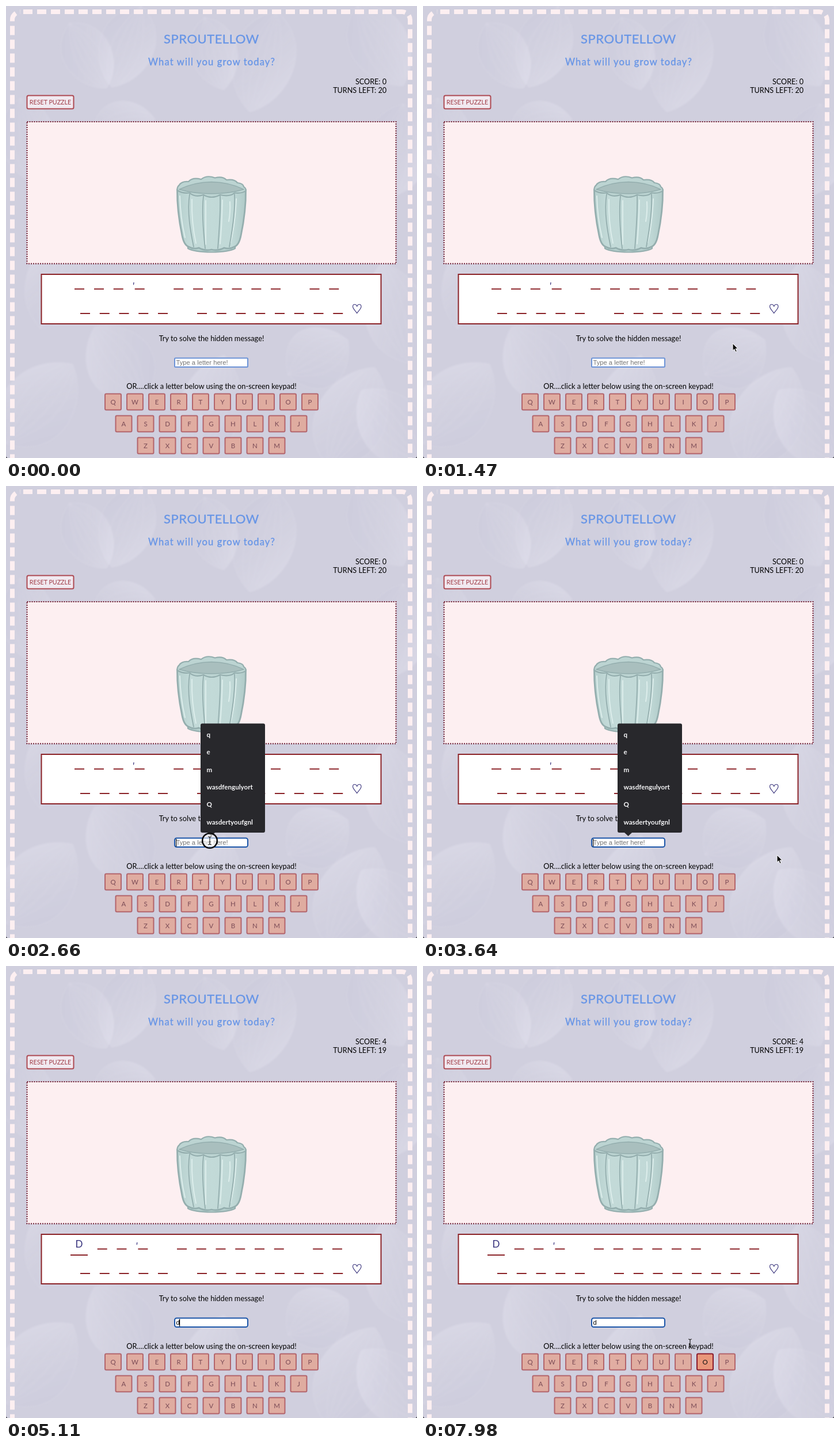
Animation, 714 px wide and 785 px high, one loop 8 s. Source, as an HTML page:

```html
<!DOCTYPE html>
<html lang="en">
<head>
<meta charset="utf-8">
<title>Sproutellow</title>
<style>
  html, body { margin: 0; width: 100%; height: 100%; overflow: hidden; background: #2a2a30; }
  svg { display: block; width: 714px; height: 785px; border-radius: 0 0 4px 4px; }
  text { font-family: Lato, "Open Sans", sans-serif; font-size: 12.8px; white-space: pre; }
  .mid { text-anchor: middle; }
  .end { text-anchor: end; font-size: 12.6px; }
  .head { fill: #6795e6; stroke: #6795e6; stroke-width: .35; }
  .field { font: 11.2px "Liberation Sans", Arial, sans-serif; }
  .list text { font-size: 11.6px; font-weight: 700; fill: #f4f4f6; }
  .key rect { fill: #e9967a; fill-opacity: .62; stroke: #a3424c; stroke-opacity: .72; stroke-width: 2; }
  .key text { font-size: 11.5px; fill: #7b4c56; text-anchor: middle; }
  .key.on rect { fill-opacity: 1; stroke: #8b1a2b; stroke-opacity: 1; }
  .key.on text { fill: #111; }
</style>
</head>
<body>
<svg viewBox="0 0 714 785">
  <defs>
    <linearGradient id="sheen" x1="0" y1="0" x2="1" y2="1">
      <stop offset="0" stop-color="#f1f0fa" stop-opacity=".75"/>
      <stop offset=".55" stop-color="#dfdeea" stop-opacity=".25"/>
      <stop offset="1" stop-color="#b9b7cc" stop-opacity=".3"/>
    </linearGradient>
    <linearGradient id="glaze">
      <stop offset="0" stop-color="#b5cfcd"/>
      <stop offset=".2" stop-color="#c3dad8"/>
      <stop offset=".8" stop-color="#c1d9d7"/>
      <stop offset="1" stop-color="#b0cac8"/>
    </linearGradient>
    <filter id="soft"><feGaussianBlur stdDeviation="1.6"/></filter>
  </defs>

  <rect width="714" height="785" fill="#d0cfde"/>
  <g id="petals" filter="url(#soft)"></g>
  <rect x="11" y="10" width="691" height="860" rx="14" fill="none" stroke="#fdeff1"
    stroke-width="8" stroke-dasharray="16 8" stroke-dashoffset="-5"/>

  <text class="mid head" x="357" y="65" style="font-size:22px;letter-spacing:.5px">SPROUTELLOW</text>
  <text class="mid head" x="357.5" y="103" style="font-size:16.5px;letter-spacing:1.15px">What will you grow today?</text>
  <text class="end" id="score" x="661" y="136"></text>
  <text class="end" id="turns" x="661" y="151"></text>

  <rect x="36.5" y="155.5" width="81" height="23" rx="2.5" fill="#f1e9f0" stroke="#ad4a53" stroke-width="2"/>
  <text class="mid" x="77" y="171" style="font-size:10.7px" fill="#a03c47">RESET PUZZLE</text>

  <rect x="36.5" y="201" width="641" height="246.5" fill="#fdeff1" stroke="#6f1c31" stroke-width="2" stroke-dasharray="2 2"/>

  <g stroke="#94aeae" stroke-width="2.2" stroke-linejoin="round" stroke-linecap="round" fill="none">
    <path fill="#b5cfcd" d="M316 414V421Q326 427 357 427.500Q388 427 398 421V414Z"/>
    <path fill="url(#glaze)" stroke-width="2.8" d="M297.500 319C297 348 302 380 306 399C308 409 312 416 317 418
      Q326 423 335 420Q346 426 357 423Q368 426 379 420Q388 423 397 418C402 416 406 409 408 399C412 380 417 348 416.500 319Z"/>
    <path stroke="#dcedeb" stroke-width="2" d="M302 330Q303 368 311 402M323 336Q322 376 330 412M347 338V414
      M376 337Q375 380 372 413M400 335Q398 380 390 411M389 340Q390 358 387 374"/>
    <path stroke-width="1.8" d="M319 327C314 358 321 394 326 418M343 330C340 358 343 394 346 421
      M372 330C373 358 370 394 368 421M397 327C399 358 392 396 388 418"/>
    <path fill="#bcd4d2" d="M297.500 320Q297 314 301 311Q305 304 317 305Q324 297 339 301Q349 293 363 298.500
      Q376 295 383 302Q397 300 402 307Q412 308 413 314Q417 316 416.500 321Q410 326 397 324.500
      Q389 332 372 328Q357 336 343 328Q328 333 319 324.500Q306 326 297.500 320Z"/>
    <path fill="#a9bfbe" stroke-width="1.6" d="M301 318.500Q326 306 357 305.500Q388 306 413 318.500Q388 326 357 326Q326 326 301 318.500Z"/>
  </g>

  <rect x="61.500" y="466" width="590" height="86" fill="#fff" stroke="#8b2328" stroke-width="2"/>
  <path id="blanks" stroke="#8b2328" stroke-width="2"/>
  <g fill="#35307c">
    <text id="quote" y="493" style="font-size:17px;font-style:italic">'</text>
    <text id="found" class="mid" x="127" y="489" style="font-size:17px">D</text>
  </g>
  <path fill="none" stroke="#443f83" stroke-width="1.2"
    d="M609.700 533.500C607 529 602.500 526 602.500 522C602.500 517 608.500 517 609.700 522C611 517 617 517 617 522C617 526 612.500 529 609.700 533.500Z"/>

  <text class="mid" x="357" y="581.500">Try to solve the hidden message!</text>
  <rect id="box" x="293" y="611.500" width="127" height="15.500" fill="#fff" stroke-width="2"/>
  <text class="field" id="typed" x="295.500" y="623"></text>
  <rect id="caret" y="613" width="1.200" height="13"/>

  <text class="mid" x="357" y="665">OR....click a letter below using the on-screen keypad!</text>
  <g id="keys"></g>

  <g id="list" class="list">
    <path fill="#28282c" d="M341 412.500H447Q450 412.500 450 415.500V599Q450 602 447 602H363L356.500 608L350 602H341Q338 602 338 599V415.500Q338 412.500 341 412.500Z"/>
  </g>
  <circle id="ring" cx="354" cy="616" r="12.800" fill="#fff" fill-opacity=".55" stroke="#0c0c0e" stroke-width="2.600"/>
  <path id="arrow" fill="#0a0a0a" stroke="#fff" stroke-width="1" d="M0 0V12.500L2.900 9.900L5 14.800L7.200 13.800L5.100 9.100H9Z"/>
  <path id="beam" fill="none" stroke="#222" stroke-width="1.200" d="M-3 -7Q0 -7 0 -5Q0 -7 3 -7M0 -5V5M-3 7Q0 7 0 5Q0 7 3 7M-1.500 2H1.500"/>
</svg>
<script>
const LOOP = 8000, STEP = 70;
const TYPED = 5110, OPENED = 2590, BACK = 7070;
const $ = id => document.getElementById(id);

function add(parent, tag, attrs, text = '') {
  const el = document.createElementNS('http://www.w3.org/2000/svg', tag);
  for (const name in attrs) el.setAttribute(name, attrs[name]);
  el.textContent = text;
  return parent.appendChild(el);
}
const show = (el, on) => { el.style.display = on ? '' : 'none'; };

// Petals: base x, base y, length, half width, angle
[
  [110, 30, 130, 62, 150], [235, 0, 150, 70, 200], [345, 20, 130, 60, 165],
  [470, 10, 180, 80, 195], [610, 0, 160, 75, 150], [25, 160, 150, 70, 170],
  [150, 215, 110, 60, 80], [690, 170, 160, 85, 185], [60, 560, 190, 80, 20],
  [0, 760, 180, 90, 40], [240, 680, 150, 85, -35], [330, 790, 190, 80, 15],
  [490, 640, 120, 80, 60], [560, 800, 190, 90, 25], [700, 620, 180, 80, -15],
  [720, 790, 160, 80, -40]
].forEach(([x, y, len, w, angle]) => {
  const petal = add($('petals'), 'g', { transform: `translate(${x} ${y}) rotate(${angle})`, opacity: .55 });
  add(petal, 'path', {
    fill: 'url(#sheen)', stroke: '#e9e8f3', 'stroke-opacity': .5,
    d: `M0 0C${w} ${-len * .2} ${w * .8} ${-len * .8} 0 ${-len}C${-w * .8} ${-len * .8} ${-w} ${-len * .2} 0 0Z`
  });
  for (let k = -2; k <= 2; k++) add(petal, 'path', {
    fill: 'none', stroke: '#e8e7f2', 'stroke-opacity': .4,
    d: `M0 0Q${k * w * .32} ${-len * .5} ${k * w * .08} ${-len * .92}`
  });
});

const keys = [];
[['QWERTYUIOP', 186, 687.5], ['ASDFGHLKJ', 204.5, 725.5], ['ZXCVBNM', 242.5, 763.5]].forEach(([row, x0, y]) =>
  [...row].forEach((letter, i) => {
    const x = x0 + i * 38;
    const el = add($('keys'), 'g', { class: 'key' });
    add(el, 'rect', { x: x - 14, y: y - 14, width: 28, height: 28, rx: 2 });
    add(el, 'text', { x, y: y + 4.5 }, letter);
    keys.push({ el, x, y });
  }));

['q', 'e', 'm', 'wasdfengulyort', 'Q', 'wasdertyoufgnl'].forEach((word, i) =>
  add($('list'), 'text', { x: 348.5, y: 436 + i * 30.3 }, word));

const PITCH = 33.75;
const run = (x, n, y) => Array.from({ length: n }, (_, i) => `M${x + i * PITCH} ${y}h17`).join('');
function blanks(solved) {
  const dx = solved ? 5.7 : 0;
  const first = solved ? 'M112 502h30' : run(119, 1, 491.5);
  return first + run(153 + dx, 2, 491.5) + run(223.7 + dx, 1, 491.5) + run(291.3 + dx, 6, 491.5)
    + run(527.5 + dx, 2, 491.5) + run(129, 5, 534) + run(332, 8, 534);
}

// Pointer stops: time, x, y
const PATH = [
  [630, 8, 772], [910, 687, 571], [980, 687, 571], [1050, 703, 591], [1260, 703, 591],
  [1470, 538, 586], [1750, 462, 645], [1890, 462, 645], [2380, 354, 616], [2800, 354, 616],
  [3080, 615, 641], [7000, 615, 641], [BACK, 612, 639], [7350, 540, 686],
  [7840, 232, 655], [7910, 486, 688], [7980, 464, 655]
];
function pointer(t) {
  const i = PATH.findIndex(p => p[0] > t);
  if (i === 0) return PATH[0].slice(1);
  if (i < 0) return PATH[PATH.length - 1].slice(1);
  const [t0, x0, y0] = PATH[i - 1], [t1, x1, y1] = PATH[i];
  const k = (t - t0) / (t1 - t0);
  return [x0 + (x1 - x0) * k, y0 + (y1 - y0) * k];
}
const within = (x, y, l, t, r, b) => x >= l && x <= r && y >= t && y <= b;

const CARET = [OPENED, 3080, 3640, 4130, 4690, 5670, 6160, 6720, 7280, 7770];

function draw(time) {
  const t = Math.floor(time / STEP) * STEP;
  const solved = t >= TYPED, focus = t >= OPENED;

  $('score').textContent = `SCORE: ${solved ? 4 : 0}`;
  $('turns').textContent = `TURNS LEFT: ${solved ? 19 : 20}`;
  $('blanks').setAttribute('d', blanks(solved));
  $('quote').setAttribute('x', solved ? 225.2 : 219.5);
  show($('found'), solved);

  $('box').setAttribute('stroke', focus ? '#1b55a8' : '#6c93d6');
  $('box').setAttribute('rx', focus ? 3.5 : 1.5);
  $('typed').textContent = solved ? 'd' : 'Type a letter here!';
  $('typed').setAttribute('fill', solved ? '#000' : '#757575');
  $('caret').setAttribute('x', solved ? 301 : 295);
  show($('caret'), CARET.filter(c => c <= t).length % 2);
  show($('list'), focus && !solved);
  show($('ring'), t >= OPENED && t < 2730);

  const [x, y] = pointer(t);
  const seen = t >= PATH[0][0] && !(solved && t < BACK);
  const overText = within(x, y, 292, 610, 421, 628) || within(x, y, 212, 652, 502, 668);
  for (const [id, on] of [['arrow', seen && !overText], ['beam', seen && overText]]) {
    show($(id), on);
    $(id).setAttribute('transform', `translate(${x} ${y})`);
  }

  // Key highlights trail the pointer by one step.
  const [hx, hy] = pointer(t - STEP);
  for (const key of keys)
    key.el.classList.toggle('on', t > BACK && Math.abs(hx - key.x) < 15 && Math.abs(hy - key.y) < 15);
}

const start = performance.now();
function tick() {
  draw((performance.now() - start) % LOOP);
  requestAnimationFrame(tick);
}
tick();
</script>
</body>
</html>
```
